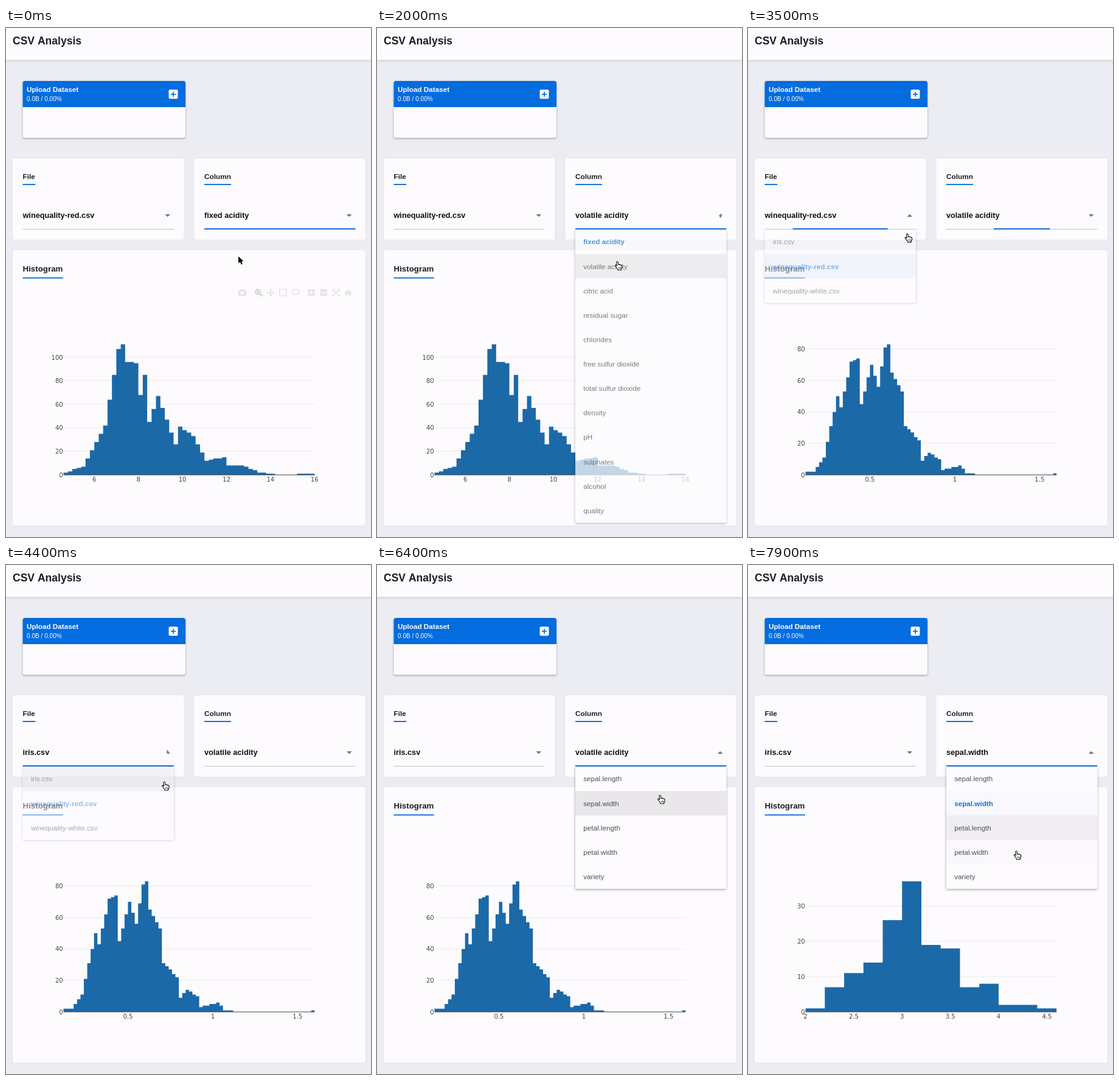
Animation of 600 by 836 pixels, one loop 8 s. Source, as an HTML page with a canvas:

```html
<!DOCTYPE html>
<html lang="en">
<head>
<meta charset="utf-8">
<title>CSV Analysis</title>
<style>
html, body { margin: 0; width: 100%; height: 100%; overflow: hidden; background: #ecedf3; }
canvas { display: block; }
</style>
</head>
<body>
<canvas id="stage" width="600" height="836"></canvas>
<script>
const ctx = document.getElementById('stage').getContext('2d');
const LOOP = 8000, ROW = 40.13, MENU_TOP = 331;
const FILE_X = 27.5, COLUMN_X = 326, FIELD_W = 248.3;
const PAPER = '#fdfbfe', BLUE = '#036cde', INK = '#1e1d21';
const SANS = '"Liberation Sans", Arial, sans-serif', DIGITS = '10px "DejaVu Sans", Verdana, sans-serif';

// outline: [bin, count] corners; the bins between them are interpolated
const charts = {
  'fixed acidity': {
    from: 4.6, to: 16, tick: 2, yStep: 20,
    outline: [[0, 2], [4, 7], [9, 42], [12, 107], [13, 111], [14, 96], [16, 95], [17, 68], [18, 85], [19, 45],
      [21, 67], [25, 26], [26, 41], [29, 33], [32, 12], [36, 15], [37, 8], [40, 8], [44, 2], [49, 0], [56, 1]]
  },
  'volatile acidity': {
    from: 0.12, to: 1.6, tick: 0.5, yStep: 20,
    outline: [[0, 2], [2, 2], [5, 11], [9, 50], [10, 43], [13, 72], [15, 74], [16, 45], [19, 70], [21, 56],
      [23, 81], [24, 83], [25, 65], [28, 53], [29, 31], [33, 22], [34, 9], [36, 14], [39, 10], [40, 3],
      [45, 6], [47, 1], [51, 0], [72, 0], [73, 1]]
  },
  'sepal.width': {
    from: 2, to: 4.6, tick: 0.5, yStep: 10,
    outline: [[0, 1], [1, 7], [3, 14], [5, 37], [6, 19], [7, 18], [8, 7], [9, 8], [10, 2], [12, 1]]
  }
};

const wine = ['fixed acidity', 'volatile acidity', 'citric acid', 'residual sugar', 'chlorides',
  'free sulfur dioxide', 'total sulfur dioxide', 'density', 'pH', 'sulphates', 'alcohol', 'quality'];
const files = ['iris.csv', 'winequality-red.csv', 'winequality-white.csv'];
const iris = ['sepal.length', 'sepal.width', 'petal.length', 'petal.width', 'variety'];
const menus = [
  { x: COLUMN_X, open: 780, close: 1960, items: wine, selected: 0 },
  { x: FILE_X, open: 3290, close: 4310, items: files, selected: 1 },
  { x: COLUMN_X, open: 5450, close: 6650, items: iris, selected: -1 },
  { x: COLUMN_X, open: 7150, close: LOOP, items: iris, selected: 1 }
];

// pointer stops
const stops = [
  { arrive: 0, leave: 60, x: 382, y: 375 },
  { arrive: 650, leave: 1100, x: 420, y: 316 },
  { arrive: 1750, leave: 1960, x: 395, y: 384 },
  { arrive: 2500, leave: 2650, x: 378, y: 352 },
  { arrive: 3150, leave: 3350, x: 262, y: 310 },
  { arrive: 3700, leave: 3700, x: 261, y: 380 },
  { arrive: 4000, leave: 4400, x: 260, y: 356 },
  { arrive: 5100, leave: 5450, x: 500, y: 318 },
  { arrive: 6350, leave: 6650, x: 465, y: 378 },
  { arrive: 7050, leave: 7400, x: 462, y: 314 },
  { arrive: LOOP, leave: LOOP, x: 439, y: 482 }
];

const clamp = p => Math.min(1, Math.max(0, p));
const mix = (a, b, p) => a + (b - a) * p;
const smooth = p => (p = clamp(p), p * p * (3 - 2 * p));
const easeOut = (p, power = 2) => 1 - (1 - clamp(p)) ** power;

function pointerAt(t) {
  const i = Math.max(1, stops.findIndex(s => s.arrive >= t));
  const a = stops[i - 1], b = stops[i];
  const p = smooth((t - a.leave) / (b.arrive - a.leave));
  return [mix(a.x, b.x, p), mix(a.y, b.y, p)];
}

function binsOf(outline) {
  const bins = [outline[0][1]];
  outline.slice(1).forEach(([end, count], i) => {
    const [start, first] = outline[i];
    for (let b = start + 1; b <= end; b++) bins.push(Math.round(mix(first, count, (b - start) / (end - start))));
  });
  return bins;
}

function text(str, x, y, size, color = INK, weight = 'bold') {
  ctx.font = `${weight} ${size}px ${SANS}`;
  ctx.fillStyle = color;
  ctx.fillText(str, x, y);
}

function rect(x, y, w, h, color) {
  ctx.fillStyle = color;
  ctx.fillRect(x, y, w, h);
}

function rounded(x, y, w, h, radius, color) {
  ctx.fillStyle = color;
  ctx.beginPath();
  ctx.roundRect(x, y, w, h, radius);
  ctx.fill();
}

function panel(x, y, w, h, radius, shadow, blur, dy = 1) {
  ctx.save();
  ctx.shadowColor = `rgba(0,0,0,${shadow})`;
  ctx.shadowBlur = blur;
  ctx.shadowOffsetY = dy;
  rounded(x, y, w, h, radius, PAPER);
  ctx.restore();
}

function heading(str, x, y, size, w, lineY) {
  text(str, x, y, size);
  rect(x, lineY, w, 2, '#1274e0');
}

function drawPage() {
  rect(0, 0, 600, 836, '#ecedf3');
  panel(0, -10, 600, 62.5, 0, 0.14, 3);
  text('CSV Analysis', 11, 26.5, 17.55);

  panel(27.5, 87, 267.5, 93.5, 3.5, 0.4, 3);
  rounded(27.5, 87, 267.5, 43, [3.5, 3.5, 0, 0], BLUE);
  text('Upload Dataset', 34, 105.4, 11.7, PAPER);
  text('0.0B / 0.00%', 34, 119.7, 10.1, PAPER, 'normal');
  rounded(267.5, 101.3, 15, 15, 2, PAPER);
  rect(271, 108, 8, 1.7, BLUE);
  rect(274.2, 104.8, 1.7, 8, BLUE);

  panel(11, 214, 281.5, 133.8, 4, 0.07, 3, 0);
  panel(309.3, 214, 281.5, 133.8, 4, 0.07, 3, 0);
  panel(11, 364.5, 579.8, 453, 4, 0.07, 3, 0);
  heading('File', FILE_X, 247.6, 11.8, 20.7, 256);
  heading('Column', COLUMN_X, 247.6, 11.8, 44, 256);
  heading('Histogram', FILE_X, 399.8, 13.35, 66.3, 409.5);
}

function drawField(x, value, focus, turn, hovered) {
  text(value, x, 312, 12.7, '#111013');
  ctx.save();
  ctx.translate(x + 238.2, 308);
  ctx.rotate(turn * Math.PI);
  ctx.fillStyle = '#757478';
  ctx.fill(new Path2D('M-4.3-2.1H4.3L0 2.2z'));
  ctx.restore();
  rect(x, 330, FIELD_W, 1, hovered ? '#1a191c' : '#c2c1c5');
  const w = FIELD_W * focus;
  rect(x + (FIELD_W - w) / 2, 329, w, 2, '#0d6fd2');
}

function drawChart({ from, to, tick, yStep, outline }) {
  const left = 94.5, width = 412.7, base = 734;
  const bins = binsOf(outline), peak = Math.max(...bins);
  const scale = 214.4 / peak, step = width / bins.length;
  ctx.font = DIGITS;
  ctx.textAlign = 'right';
  for (let v = 0; v < peak; v += yStep) {
    const y = base - v * scale;
    if (v) rect(left, Math.round(y) - 0.5, width, 1, '#ebeaed');
    ctx.fillStyle = '#444';
    ctx.fillText(v, 93.6, y + 3.7);
  }
  ctx.textAlign = 'center';
  for (let v = Math.ceil(from / tick) * tick; v <= to; v += tick) {
    ctx.fillText(v, left + (v - from) / (to - from) * width, 745);
  }
  ctx.textAlign = 'left';
  ctx.beginPath();
  bins.forEach((n, i) => ctx.rect(left + i * step, base - n * scale, step, n * scale));
  ctx.fillStyle = '#1c69a8';
  ctx.fill();
  rect(left, 733.5, width, 1, '#444');
}

function drawToolbar(alpha) {
  if (alpha <= 0) return;
  const icon = (x, d, filled = true, opacity = 0.3) => {
    ctx.save();
    ctx.translate(x, 428);
    ctx.globalAlpha = alpha * opacity;
    ctx.fillStyle = ctx.strokeStyle = '#444';
    ctx.lineWidth = 1.5;
    const shape = new Path2D(d);
    filled ? ctx.fill(shape, 'evenodd') : ctx.stroke(shape);
    ctx.restore();
  };
  const square = 'M1 1h11v11H1z';
  icon(382, 'M0 3h3l1-2h5l1 2h3v9H0zM6.5 4a3 3 0 1 0 .1 0z');
  icon(408.5, 'M9.5 5.5a4 4 0 1 1-8 0a4 4 0 1 1 8 0zM8.5 8.5L13 13M3.5 5.5h4M5.5 3.5v4', false, 0.7);
  icon(428.5, 'M6.5 1v11M1 6.5h11M5 2.5L6.5 1 8 2.5M5 10.5L6.5 12 8 10.5M2.5 5L1 6.5 2.5 8M10.5 5L12 6.5 10.5 8', false);
  let dots = '';
  for (let i = 0; i < 5; i++) {
    const p = i * 2.7;
    dots += `M${p} 0h2v2h-2zM${p} 10.8h2v2h-2z`;
    if (i && i < 4) dots += `M0 ${p}h2v2h-2zM10.8 ${p}h2v2h-2z`;
  }
  icon(449, dots);
  icon(469, 'M3 9C-1 6 2 1 8 1s6 7 1 7.5S3 7 3 9.5s2 1 1 3', false);
  icon(495.5, square + 'M5.5 3h2v2.500H10v2H7.500V10h-2V7.500H3v-2h2.500z');
  icon(515.5, square + 'M3 5.500h7v2H3z');
  icon(536, 'M1 4V1h3M9 1h3v3M12 9v3H9M4 12H1V9M3 3l7 7M10 3l-7 7', false);
  icon(556, 'M6.500 1L13 7 12 8 6.500 3 1 8 0 7zM6.500 4L11 8v4H8V9H5v3H2V8z');
}

function menuAlpha(m, t) {
  return easeOut((t - m.open - 120) / 300) * (1 - easeOut((t - m.close) / 300));
}

function rowAt(m, t) {
  const y = pointerAt(Math.max(0, Math.min(t, m.close)))[1];
  return y < MENU_TOP ? m.selected : Math.floor((y - MENU_TOP) / ROW);
}

function drawMenu(m, t) {
  const alpha = menuAlpha(m, t), h = m.items.length * ROW;
  if (alpha <= 0) return;
  ctx.save();
  ctx.globalAlpha = alpha;

  // keep the shadow outside, so it does not darken the faded sheet
  ctx.save();
  ctx.beginPath();
  ctx.rect(m.x - 8, MENU_TOP, FIELD_W + 16, h + 12);
  ctx.rect(m.x, MENU_TOP, FIELD_W, h);
  ctx.clip('evenodd');
  panel(m.x, MENU_TOP, FIELD_W, h, 0, 0.4, 4);
  ctx.restore();
  rect(m.x, MENU_TOP, FIELD_W, h, PAPER);

  // row tint trails the pointer
  const heat = m.items.map(() => 0), samples = 15;
  for (let i = 0; i < samples; i++) {
    const row = rowAt(m, t - 50 - i * 10);
    if (row in heat) heat[row] += 1 / samples;
  }
  m.items.forEach((item, i) => {
    const y = MENU_TOP + i * ROW, chosen = i === m.selected;
    rect(m.x, y, FIELD_W, ROW, chosen ? `rgba(25,118,210,${heat[i] * 0.1})` : `rgba(0,0,0,${heat[i] * 0.08})`);
    text(item, m.x + 13.2, y + 24.4, 11.7, chosen ? '#1673d8' : '#505054', chosen ? 'bold' : 'normal');
  });
  ctx.restore();
}

const arrow = new Path2D('M0 0V11.5L2.700 9 4.700 13.500 7 12.500 5 8.300H8.500z');
const hand = new Path2D('M-1 1.500Q-1 0 .2 0T1.500 1.500L2 5.500Q2 4.500 3.200 4.700T4.400 6Q4.600 5 5.600 5.200T6.600 6.500Q8 6 8 7.200V10L6.700 12.500V14H1V13L-1.500 9.500-3.300 7.200Q-3.500 6-2.300 5.800-1.400 6-.4 7.400z');
const fingers = new Path2D('M2.600 9v3M4.300 9v3M6 9v3');

function drawPointer(x, y, pointing) {
  ctx.save();
  ctx.translate(x, y);
  ctx.lineJoin = 'round';
  if (pointing) {
    ctx.fillStyle = '#fff';
    ctx.strokeStyle = '#111';
    ctx.lineWidth = 1.1;
    ctx.fill(hand);
    ctx.stroke(hand);
    ctx.lineWidth = 0.7;
    ctx.stroke(fingers);
  } else {
    ctx.strokeStyle = '#fff';
    ctx.lineWidth = 1.8;
    ctx.stroke(arrow);
    ctx.fillStyle = '#000';
    ctx.fill(arrow);
  }
  ctx.restore();
}

function draw(t) {
  const [px, py] = pointerAt(t);
  const within = (x, top, bottom) => px >= x && px <= x + FIELD_W && py >= top && py <= bottom;
  const onField = x => within(x, 288, MENU_TOP);
  const turn = x => menus.filter(m => m.x === x).reduce(
    (sum, m) => sum + easeOut((t - m.open) / 280, 3) - easeOut((t - m.close) / 280, 3), 0);
  const columnAt = time => time < menus[0].close ? wine[0] : time < menus[2].close ? wine[1] : iris[1];
  const fileAt = time => time < menus[1].close ? files[1] : files[0];
  const fileFocus = smooth((t - menus[1].open) / 360) - smooth((t - menus[2].open) / 360);

  drawPage();
  drawField(FILE_X, fileAt(t), fileFocus, turn(FILE_X), onField(FILE_X));
  drawField(COLUMN_X, columnAt(t), 1 - fileFocus, turn(COLUMN_X), onField(COLUMN_X));
  drawChart(charts[columnAt(t - 150)]);
  drawToolbar(0.45 * (1 - t / 180));
  menus.forEach(m => drawMenu(m, t));

  const onMenu = menus.some(m => menuAlpha(m, t) > 0 && within(m.x, MENU_TOP, MENU_TOP + m.items.length * ROW));
  drawPointer(px, py, onMenu || onField(FILE_X) || onField(COLUMN_X));
}

function tick() {
  draw(performance.now() % LOOP);
  requestAnimationFrame(tick);
}
tick();
</script>
</body>
</html>
```
